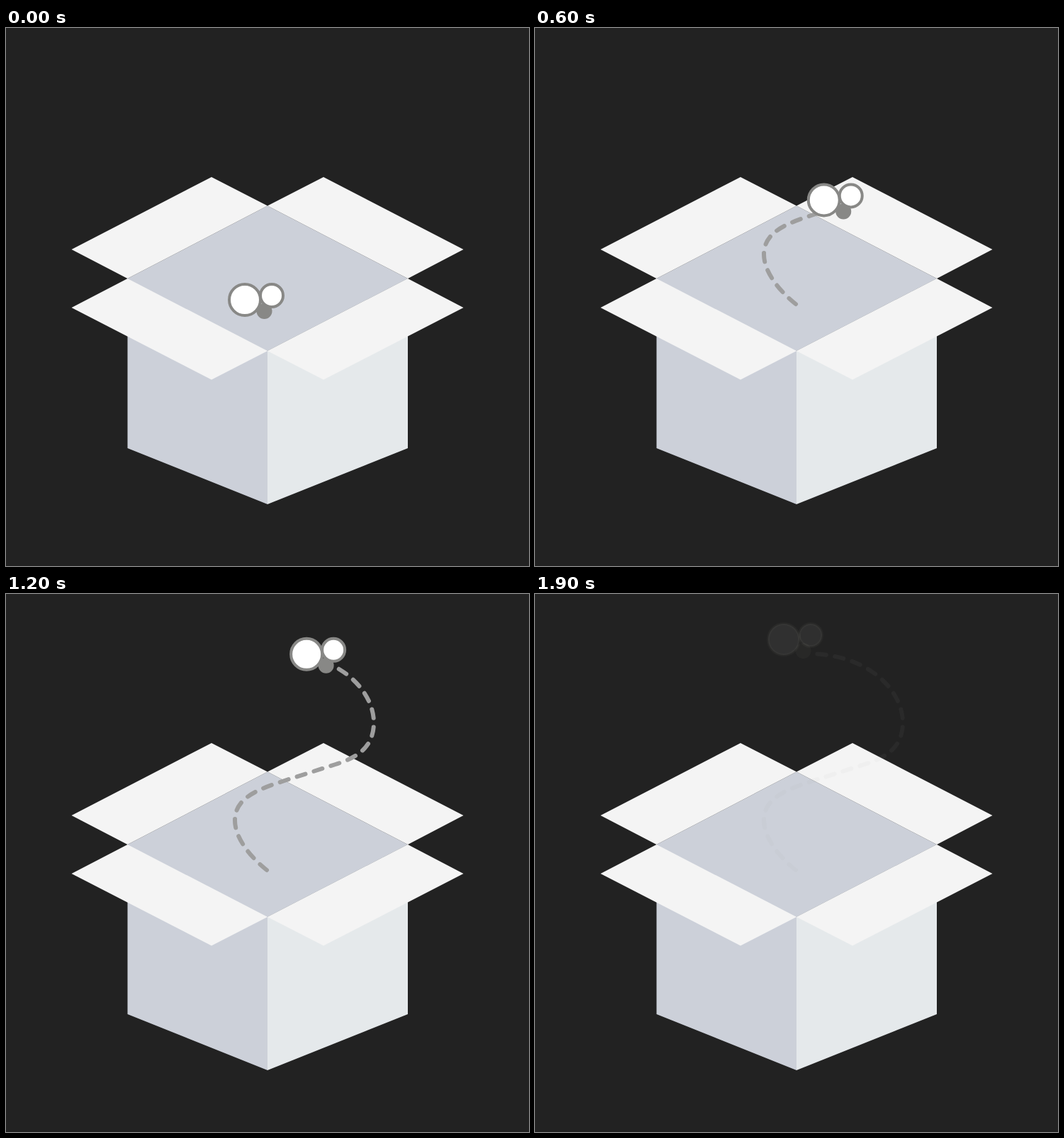
These frames come from a looping animation (738x758 px, 2000 ms). An HTML page:

```html
<!DOCTYPE html>
<html lang="en">
<head>
<meta charset="utf-8">
<title>Empty box</title>
<style>
  html, body { margin: 0; width: 100%; height: 100%; overflow: hidden; background: #222; }
  svg { display: block; }
  .flaps { fill: #f4f4f4; }
  .shade { fill: #ccd0d9; }
  .light { fill: #e5e9eb; }
  .eye { fill: #fff; stroke: #888886; stroke-width: 4; }
  #trail { fill: none; stroke: #9e9e9e; stroke-width: 6; stroke-linecap: round; }
</style>
</head>
<body>
<svg width="738" height="758" viewBox="0 0 738 758">
  <path class="shade" d="M369 250.5L567 353 369 455V671L171.5 592V353Z"/>
  <path class="light" d="M369 455L567 353V592L369 671Z"/>
  <path class="flaps" d="M290 210L369 250.5 171.5 353 92.5 312Z
    M448 210L645.5 312 567 353 369 250.5Z
    M171.5 353L369 455 290 495.5 92.5 394Z
    M567 353L645.5 394 448 495.5 369 455Z"/>
  <path id="route" fill="none" d="M337 383C313 364 292 337 292 313C292 281 325 269 362 257
    L434 234C466 224 488 209 488 175C488 123 428 68 351 64"/>
  <g id="scene">
    <path id="trail" pathLength="527" d="M368 389C344 370 323 343 323 319C323 287 356 275 393 263
      L465 240C497 230 519 215 519 181C519 138 474 86 388 84"/>
    <g id="fly">
      <circle cx="27.5" cy="16" r="11" fill="#888886"/>
      <circle class="eye" r="22"/>
      <circle class="eye" cx="38" cy="-6" r="16"/>
    </g>
  </g>
</svg>
<script>
  const LOOP = 2000, STEP = 100, FLIGHT = 1400, FADE_START = 1340;
  const TRAIL_LENGTH = 527, DASH = 12.6;
  const [route, scene, trail, fly] =
    ['route', 'scene', 'trail', 'fly'].map(id => document.getElementById(id));
  const routeLength = route.getTotalLength();

  // Whole dashes up to the drawn length, then a partial one and an endless gap.
  function dashesUpTo(length) {
    const whole = Math.floor(length / (2 * DASH));
    const rest = Math.min(DASH, length - whole * 2 * DASH);
    return `${DASH} ${DASH} `.repeat(whole) + `${rest} 9999`;
  }

  function draw(time) {
    const progress = Math.min(1, time / FLIGHT);
    const { x, y } = route.getPointAtLength(progress * routeLength);
    fly.setAttribute('transform', `translate(${x} ${y})`);
    trail.setAttribute('stroke-dasharray', dashesUpTo(progress * TRAIL_LENGTH));

    const fade = Math.max(0, (time - FADE_START) / (LOOP - FADE_START));
    const alpha = 1 - fade * fade * (3 - 2 * fade);
    scene.setAttribute('fill-opacity', alpha);
    scene.setAttribute('stroke-opacity', alpha);
  }

  const start = performance.now();
  function tick() {
    const time = (performance.now() - start) % LOOP;
    draw(Math.floor(time / STEP) * STEP);
    requestAnimationFrame(tick);
  }
  tick();
</script>
</body>
</html>
```
